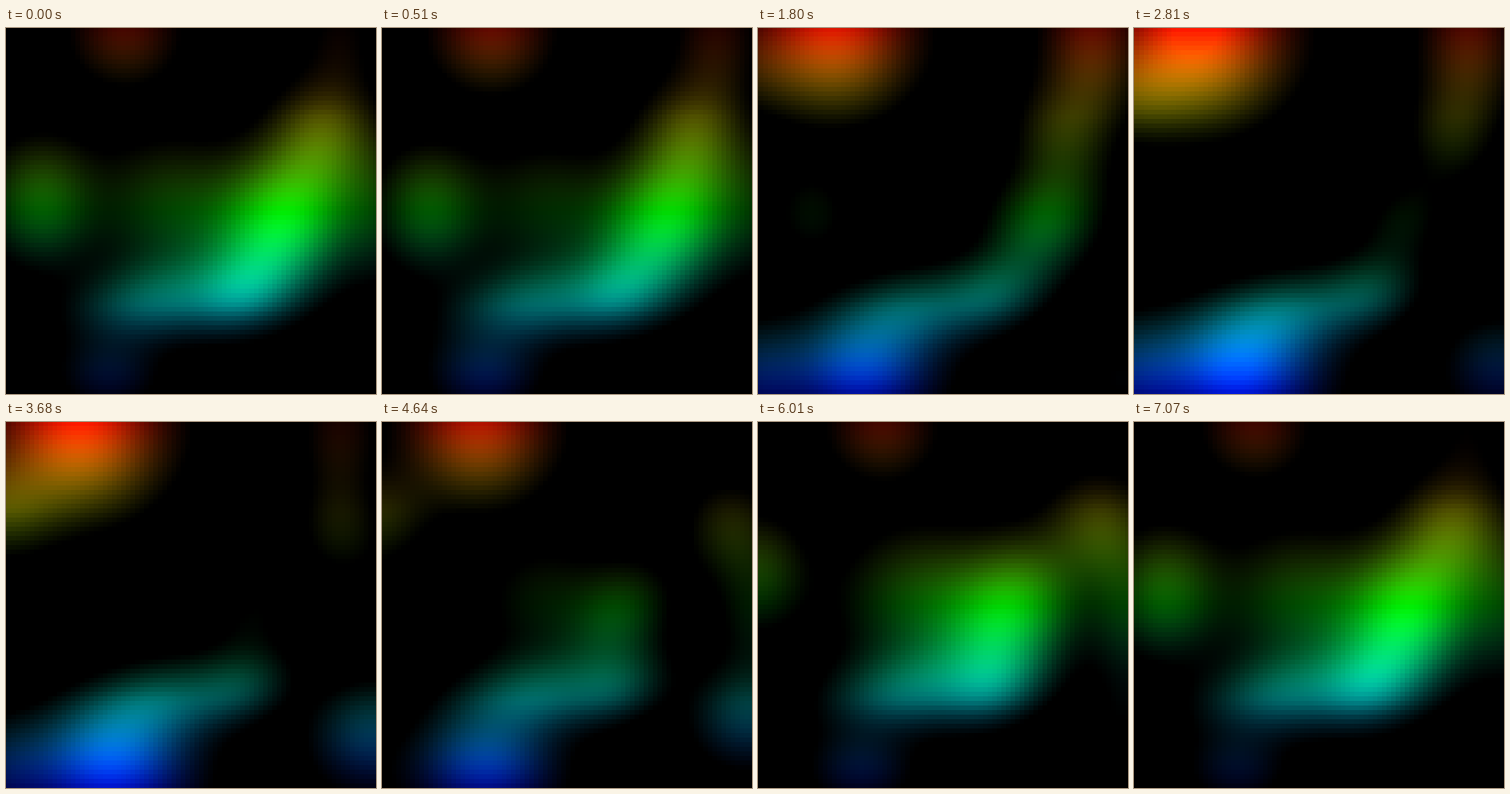
Animation of 485x479 px, one loop 7150 ms. Source, as an HTML page with a canvas:

```html
<!DOCTYPE html>
<html lang="en">
<head>
<meta charset="utf-8">
<title>Spectrum noise</title>
<style>
  html, body { margin: 0; width: 100%; height: 100%; overflow: hidden; background: #000; }
  canvas { display: block; }
</style>
</head>
<body>
<canvas id="stage" width="485" height="479"></canvas>
<script>
const WIDTH = 485, HEIGHT = 479, CELL = 6;
const LOOP = 7150, FIRST_STEP = 50, STEP = 78.9;
const DARK = .12;

const clamp = (v, lo, hi) => Math.min(hi, Math.max(lo, v));
const wave = (phase, peak) => Math.cos((phase - peak) * Math.PI / 180);

// A soft light that is brightest at phase `peak` (degrees of the loop).
// It may sway by dx, dy, farthest out at phase `lead`.
const glow = (x, y, rx, ry, high, peak, options) =>
  ({ x, y, rx, ry, high, peak, swing: .6, tilt: 0, dx: 0, dy: 0, lead: 0, ...options });

const GLOWS = {
  red: glow(125, 5, 85, 80, 1.19, 150, { swing: .36, dx: 40, lead: 320 }),
  amber: glow(-10, 75, 95, 80, .38, 170, { dy: 45, lead: 230 }),
  leftGreen: glow(25, 215, 80, 90, .48, 355, { dx: 50, dy: 30, lead: 65 }),
  rightRed: glow(438, 15, 72, 115, .5, 100),
  gold: glow(425, 140, 80, 90, .36, 350, { swing: .25, dx: 30, lead: 250 }),
  green: glow(345, 255, 90, 70, 1.02, 350, { swing: .45, tilt: -50, dx: 35, lead: 60 }),
  rightEdge: glow(490, 240, 70, 130, .33, 300),
  middle: glow(215, 235, 120, 110, .41, 315),
  teal: glow(195, 365, 120, 62, .48, 0, { swing: 0, tilt: -12, dy: 15, lead: 125 }),
  shoulder: glow(310, 345, 85, 60, .37, 10, { swing: .12, tilt: -20 }),
  blue: glow(135, 455, 85, 60, 1.07, 155, { swing: .39 }),
  leftBlue: glow(0, 460, 80, 80, .5, 130, { swing: .75 }),
  rightBlue: glow(480, 420, 90, 80, .45, 190, { dy: 40, lead: 90 })
};

// Place, brightness and axes of a glow; brighter ones also spread wider.
function pose(g, phase) {
  const level = g.high * (1 - g.swing + g.swing * wave(phase, g.peak));
  const sway = wave(phase, g.lead);
  const spread = .6 + .5 * level;
  const angle = g.tilt * Math.PI / 180;
  return {
    level,
    x: g.x + g.dx * sway,
    y: g.y + g.dy * sway,
    rx: g.rx * spread,
    ry: g.ry * spread,
    cos: Math.cos(angle),
    sin: Math.sin(angle)
  };
}

function lightFrom(p, x, y) {
  const dx = x - p.x, dy = y - p.y;
  const u = (dx * p.cos + dy * p.sin) / p.rx;
  const v = (dy * p.cos - dx * p.sin) / p.ry;
  return p.level * Math.exp(-u * u - v * v);
}

function hueToRgb(hue) {
  return [0, 120, 240].map(center => {
    const gap = Math.abs(hue - center);
    return 255 * clamp(2 - Math.min(gap, 360 - gap) / 60, 0, 1);
  });
}

const ctx = document.getElementById("stage").getContext("2d");

function draw(step) {
  const time = step ? FIRST_STEP + (step - 1) * STEP : 0;
  const poses = Object.values(GLOWS)
    .map(g => pose(g, time / LOOP * 360))
    .filter(p => p.level > 0);
  ctx.fillStyle = "#000";
  ctx.fillRect(0, 0, WIDTH, HEIGHT);
  for (let y = -1; y < HEIGHT; y += CELL) {
    const cy = y + CELL / 2;
    const rgb = hueToRgb(5 + cy / HEIGHT * 230);
    for (let x = 1 - CELL; x < WIDTH; x += CELL) {
      const sum = poses.reduce((s, p) => s + lightFrom(p, x + CELL / 2, cy), -DARK);
      if (sum <= 0) continue;
      const light = Math.min(1, sum);
      ctx.fillStyle = `rgb(${rgb.map(c => Math.round(c * light)).join(",")})`;
      ctx.fillRect(x, y, CELL, CELL);
    }
  }
}

const start = performance.now();
let shown = -1;

function tick() {
  const time = (performance.now() - start) % LOOP;
  const step = time < FIRST_STEP ? 0 : 1 + Math.floor((time - FIRST_STEP) / STEP);
  if (step !== shown) draw(shown = step);
  requestAnimationFrame(tick);
}
tick();
</script>
</body>
</html>
```
